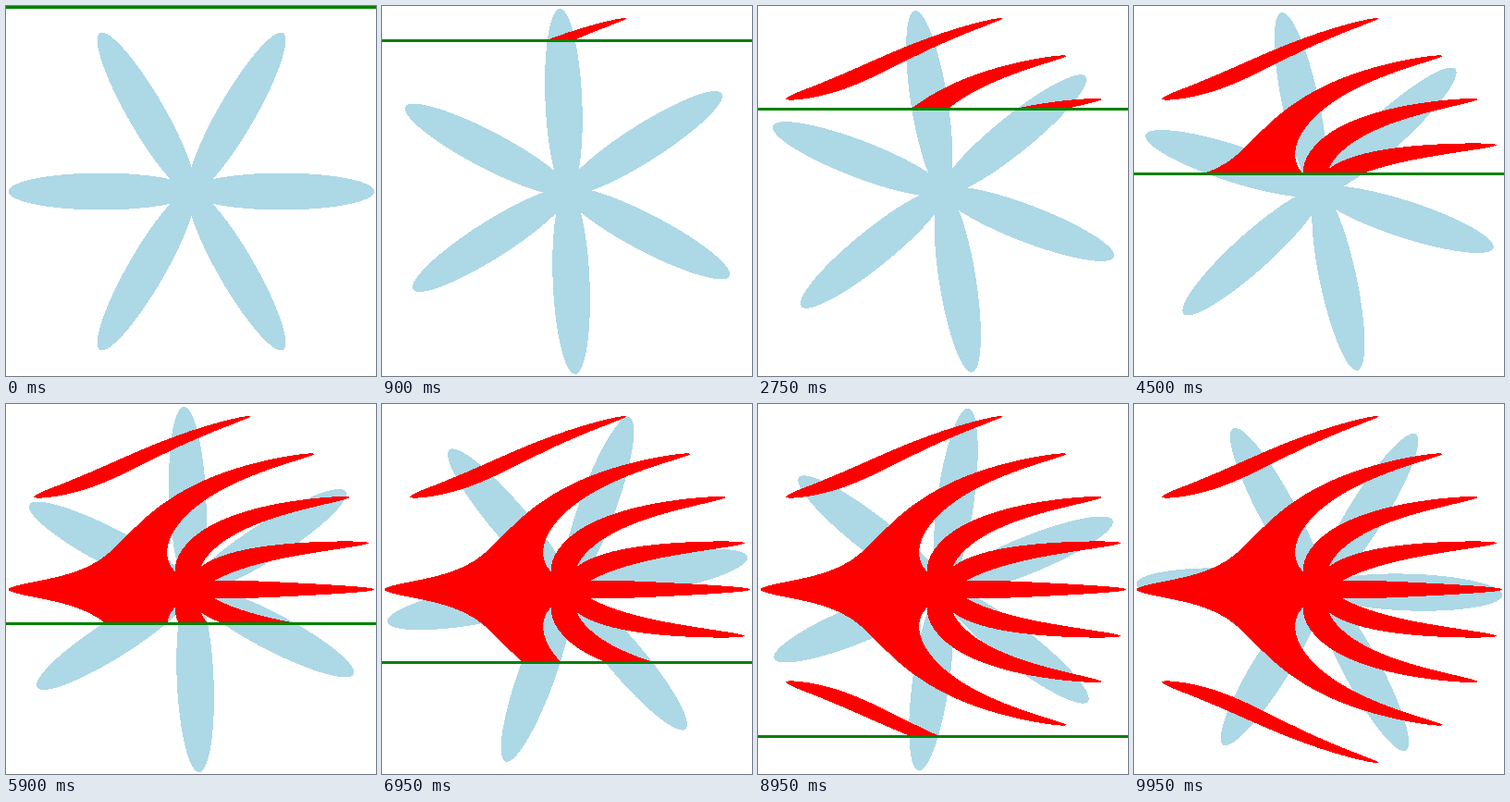
Animation of 400 by 400 pixels, one loop 10 s. Source, as an HTML page with a canvas:

```html
<!DOCTYPE html>
<html lang="en">
<head>
<meta charset="utf-8">
<title>Slit scan of a turning flower</title>
<style>
  html, body { margin: 0; width: 100%; height: 100%; overflow: hidden; background: #fff; }
  canvas { display: block; width: 400px; height: 400px; }
</style>
</head>
<body>
<canvas id="stage" width="400" height="400"></canvas>
<script>
const SIZE = 400, MID = 200;
const LOOP = 10000, STEP = 50, STEPS = LOOP / STEP;
const LAST_LINE = 197;
const PETALS = 6;
const PETAL = { offset: 97.7, a: 100, b: 19.9 };

const ctx = document.getElementById('stage').getContext('2d');

// Fill one pixel row of the flower turned counter-clockwise by `turn` radians.
function flowerRow(y, turn) {
  const { offset, a, b } = PETAL;
  const h = MID - y;
  for (let k = 0; k < PETALS; k++) {
    const phi = turn + k * 2 * Math.PI / PETALS;
    const c = Math.cos(phi), s = Math.sin(phi);
    const p = h * s - offset, q = h * c;
    const A = (c / a) ** 2 + (s / b) ** 2;
    const B = c * p / a ** 2 - s * q / b ** 2;
    const C = (p / a) ** 2 + (q / b) ** 2 - 1;
    const disc = B * B - A * C;
    if (disc <= 0) continue;
    const root = Math.sqrt(disc);
    const left = Math.ceil((-B - root) / A);
    const right = Math.floor((-B + root) / A);
    if (right >= left) ctx.fillRect(MID + left, y, right - left + 1, 1);
  }
}

function draw(step) {
  const line = step * SIZE / STEPS;
  const turn = 2 * Math.PI * step / STEPS;

  ctx.fillStyle = '#fff';
  ctx.fillRect(0, 0, SIZE, SIZE);

  ctx.fillStyle = 'lightblue';
  for (let y = 0; y < SIZE; y++) flowerRow(y, turn);

  // Each scanned row keeps the pose it had when the line passed.
  ctx.fillStyle = 'red';
  for (let y = 0; y < line; y++) flowerRow(y, 2 * Math.PI * y / SIZE);

  if (step <= LAST_LINE) {
    ctx.fillStyle = 'green';
    ctx.fillRect(0, line, SIZE, 3);
  }
}

const start = performance.now();
let shown = -1;

function tick() {
  const t = Math.max(0, performance.now() - start) % LOOP;
  const step = Math.floor(t / STEP + 1e-6) % STEPS;
  if (step !== shown) draw(shown = step);
  requestAnimationFrame(tick);
}
tick();
</script>
</body>
</html>
```
